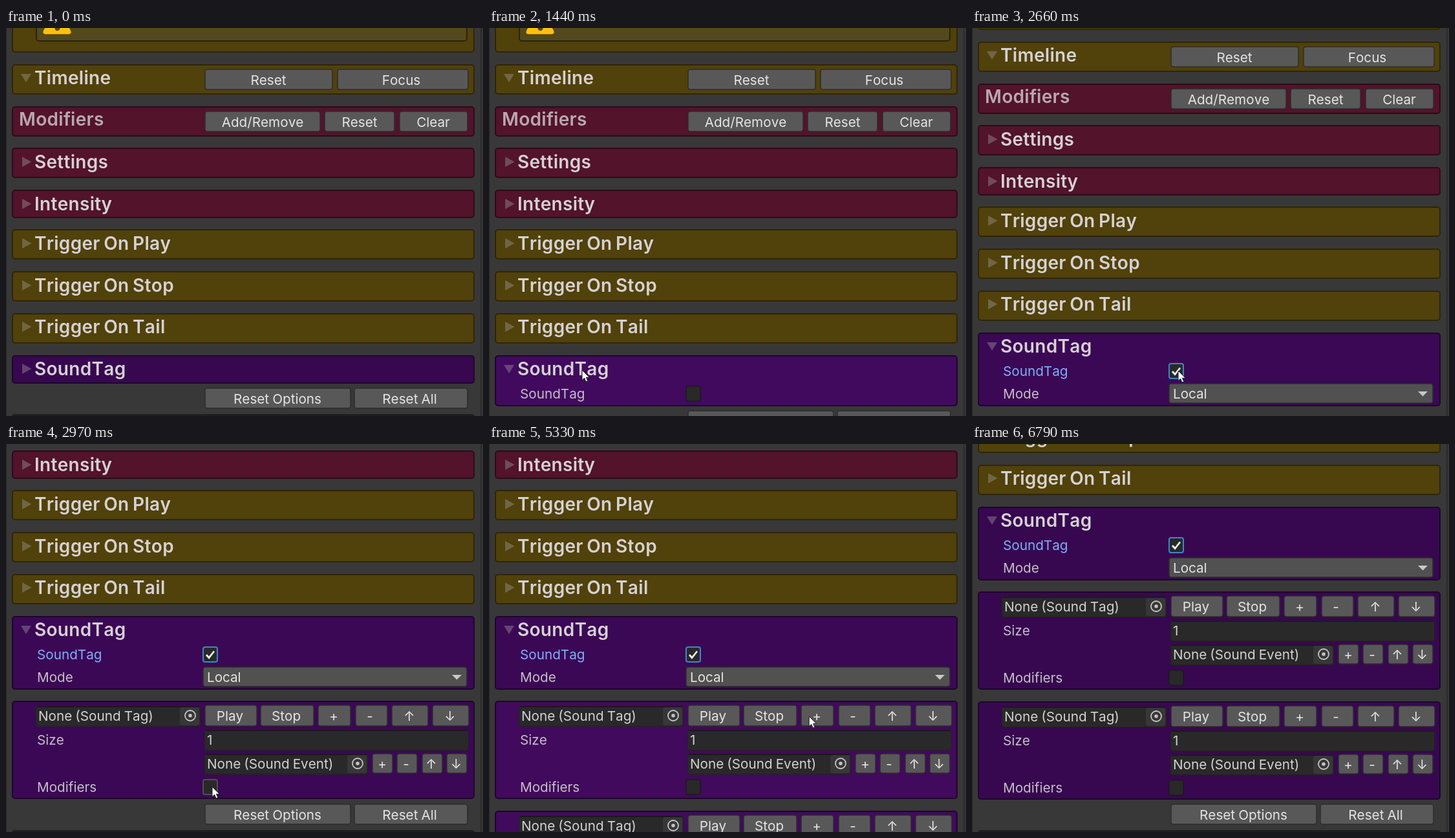
These frames come from a looping animation (738x600 px, 8000 ms). An HTML page:

```html
<!DOCTYPE html>
<html lang="en">
<head>
<meta charset="utf-8">
<title>Inspector panel</title>
<style>
html, body { margin: 0; width: 100%; height: 100%; overflow: hidden; background: #383838; }
svg { display: block; width: 738px; height: 600px; }
text {
  font: 400 20.7px Inter, sans-serif;
  font-kerning: none;
  font-optical-sizing: none;
  word-spacing: -.8px;
  fill: #c4bfc6;
  white-space: pre;
}
.head { font-size: 28px; font-weight: 600; letter-spacing: .3px; word-spacing: -1.8px; fill: #d5d2d3; }
.dim { fill: #b9a8ae; }
.btn, .pick { fill: #e4e4e4; }
.btn { text-anchor: middle; }
.val { fill: #d2d2d2; }
.on { fill: #7fb0fb; }
</style>
</head>
<body>
<svg viewBox="0 0 738 600">
  <rect width="738" height="600" fill="#383838"/>
  <g id="page"></g>
  <rect width="1" height="600" fill="#292929"/>
  <rect x="734" width="2" height="600" fill="#2a2a2a"/>
  <path id="cursor" d="M0 0V15.6L3.6 12.3L6 18L8.8 16.8L6.4 11.3H11.2Z"
    fill="#fff" stroke="#1c1c1c" stroke-width="1" stroke-linejoin="round"/>
</svg>
<script>
const LOOP = 8000;
const page = document.getElementById('page');
const cursor = document.getElementById('cursor');

const OLIVE = ['#51410a', '#2f2608'];
const WINE = ['#52132b', '#2e0a18'];

// Each phase: start, scroll, foldout open, checkbox on, tag blocks, purple tints, hover, pressed
const phases = [
  { t: 0, scroll: 0, open: 0, on: 0, tags: 0, tint: '#370850' },
  { t: 1380, scroll: 0, open: 1, on: 0, tags: 0, tint: '#3c0957' },
  { t: 1440, scroll: 0, open: 1, on: 0, tags: 0, tint: '#410a5e' },
  { t: 1810, scroll: 35, open: 1, on: 0, tags: 0, tint: '#410a5e' },
  { t: 2660, scroll: 35, open: 1, on: 1, tags: 1, tint: '#3b0855' },
  { t: 2970, scroll: 240, open: 1, on: 1, tags: 1, tint: '#3b0855', hover: 1 },
  { t: 3200, scroll: 240, open: 1, on: 1, tags: 1, tint: '#3b0855' },
  { t: 5200, scroll: 240, open: 1, on: 1, tags: 1, tint: '#3b0855', press: 1 },
  { t: 5270, scroll: 240, open: 1, on: 1, tags: 2, tint: '#3b0855', tagTint: '#410a5c' },
  { t: 6230, scroll: 409, open: 1, on: 1, tags: 2, tint: '#370850' }
];

// Pointer path: time, x, y
const moves = [
  [490, 21, 543], [850, 153, 528],
  [1110, 153, 528], [1230, 144, 529],
  [2050, 144, 529], [2260, 230, 476], [2490, 319, 530],
  [3140, 319, 530], [3740, 322, 412],
  [4050, 322, 412], [4140, 286, 420], [4290, 398, 434], [4830, 501, 422],
  [5200, 501, 422], [5990, 422, 410],
  [6050, 422, 408], [6170, 420, 400], [6230, 420, 392],
  [6600, 420, 392], [6730, 304, 500]
];
const HIDE = 6790;

const rect = (x, y, w, h, fill, stroke = 'none', sw = 1.5, r = 3.5) =>
  `<rect x="${x}" y="${y}" width="${w}" height="${h}" rx="${r}" fill="${fill}" stroke="${stroke}" stroke-width="${sw}"/>`;

const text = (x, y, s, cls = '') => `<text x="${x}" y="${y}" class="${cls}">${s}</text>`;

const panel = (top, bottom, [fill, edge]) => rect(10, top, 714, bottom - top, fill, edge, 2, 4);

// mid is the centre of the label
function button(x1, x2, y, h, label, mid, fill = '#585858') {
  return rect(x1, y, x2 - x1, h, fill, '#2c2c2c') + text(mid, y + h / 2 + 8, label, 'btn');
}

function arrow(base, open) {
  const d = open
    ? `M23 ${base - 16}H39L31 ${base - 3}Z`
    : `M25 ${base - 18}V${base - 2}L39.5 ${base - 10}Z`;
  return `<path d="${d}" fill="#9a9a9a" opacity=".42"/>`;
}

const foldout = (top, bottom, base, colors, title, open) =>
  panel(top, bottom, colors) + arrow(base, open) + text(44, base, title, 'head');

function checkbox(y, on, hover) {
  const edge = on ? '#3d86c6' : hover ? '#5c5c5c' : '#1b1b1b';
  let s = rect(305, y, 22, 23, '#292929', edge, on ? 2 : 1.5, 3);
  if (on) {
    s += `<path d="M310 ${y + 12}L314 ${y + 16.5}L322 ${y + 6.5}" fill="none" stroke="#f0f0f0" stroke-width="2.8"/>`;
  }
  return s;
}

const field = (x, y, w, h) =>
  rect(x, y, w, h, '#222222', 'none', 0) +
  rect(x + 1, y + 1, w - 2, h - 2, '#292929', 'none', 0, 3) +
  rect(x + 2, y + .5, w - 4, 1.5, '#171717', 'none', 0, 1);

function objectField(x, y, w, h, label) {
  const cx = x + w - 16, cy = y + h / 2 - 1;
  return field(x, y, w, h) +
    rect(x + w - 32, y + 2, 30, h - 4, '#373737', 'none', 0) +
    `<circle cx="${cx}" cy="${cy}" r="8" fill="none" stroke="#c4c4c4" stroke-width="1.8"/>` +
    `<circle cx="${cx}" cy="${cy}" r="2.8" fill="#c4c4c4"/>` +
    text(x + 4, cy + 8, label, 'val');
}

function tagBlock(y, p) {
  return panel(y, y + 150, purple(p.tagTint || p.tint)) +
    objectField(46, y + 7, 255, 32, 'None (Sound Tag)') +
    button(308, 388, y + 6, 32, 'Play', 346.5) +
    button(394, 476, y + 6, 32, 'Stop', 433.5) +
    button(483, 533, y + 6, 32, '+', 507, p.press ? '#46607c' : '#585858') +
    button(541, 590, y + 6, 32, '-', 563) +
    button(597, 653, y + 6, 32, '↑', 624) +
    button(660, 716, y + 6, 32, '↓', 687) +
    text(48, y + 67, 'Size') +
    field(307, y + 44, 409, 32) + text(311, y + 67, '1', 'val') +
    objectField(307, y + 81, 253, 32, 'None (Sound Event)') +
    button(567, 598, y + 81, 30, '+', 582) +
    button(605, 636, y + 81, 30, '-', 619) +
    button(644, 675, y + 81, 30, '↑', 658) +
    button(682, 713, y + 81, 30, '↓', 696.5) +
    text(48, y + 140, 'Modifiers') +
    checkbox(y + 121, false, p.hover);
}

const purple = tint => [tint, '#1e052c'];

function warningBox() {
  return panel(-60, 37, OLIVE) +
    rect(47, -40, 666, 60, '#54491d', '#2a240d', 2, 4) +
    '<path d="M79 -32L99 3Q102 9 97 9H61Q56 9 59 3Z" fill="#ffc10d" stroke="#ffc10d" stroke-width="1"/>' +
    '<circle cx="79.5" cy="0" r="4.2" fill="#54491d"/>';
}

function soundTag(p) {
  const bottom = p.on ? 619 : p.open ? 584 : 549;
  let s = foldout(507, bottom, 537, purple(p.tint), 'SoundTag', p.open);
  if (p.open) s += text(48, 573, 'SoundTag', p.on ? 'on' : '') + checkbox(554, p.on);
  if (p.on) {
    s += text(48, 608, 'Mode') +
      rect(305, 585, 408, 30, '#515151', '#2c2c2c') +
      text(311, 607.5, 'Local', 'pick') +
      '<path d="M690 597H705L697.5 604.5Z" fill="#c8c8c8"/>';
  }
  for (let i = 0; i < p.tags; i++) s += tagBlock(638 + i * 170, p);
  return s;
}

function draw(p) {
  const end = p.tags ? 669 + p.tags * 169 : p.open ? 633 : 598;
  page.setAttribute('transform', `translate(0 ${-p.scroll})`);
  page.innerHTML = warningBox() +
    foldout(57, 102, 87, OLIVE, 'Timeline', true) +
    button(308, 505, 64, 31, 'Reset', 406) +
    button(513, 715, 64, 31, 'Focus', 611.5) +
    panel(122, 167, WINE) + text(20, 151, 'Modifiers', 'head dim') +
    button(308, 486, 129, 31, 'Add/Remove', 397) +
    button(493, 601, 129, 31, 'Reset', 547) +
    button(609, 714, 129, 31, 'Clear', 661) +
    foldout(186, 231, 217, WINE, 'Settings') +
    foldout(251, 293, 282, WINE, 'Intensity') +
    foldout(312, 357, 343, OLIVE, 'Trigger On Play') +
    foldout(377, 422, 408, OLIVE, 'Trigger On Stop') +
    foldout(442, 487, 472, OLIVE, 'Trigger On Tail') +
    soundTag(p) +
    button(308, 533, end - 41, 31, 'Reset Options', 420) +
    button(539, 714, end - 41, 31, 'Reset All', 624.5) +
    rect(9, end - 1, 716, 20, '#1f1f1f', 'none', 0, 4);
}

function pointer(t) {
  let i = 0;
  while (i < moves.length - 1 && moves[i + 1][0] <= t) i++;
  const a = moves[i], b = moves[i + 1] || a;
  const k = b === a ? 0 : (t - a[0]) / (b[0] - a[0]);
  const e = k * k * (3 - 2 * k);
  return [a[1] + (b[1] - a[1]) * e, a[2] + (b[2] - a[2]) * e];
}

let current = null;
function render(t) {
  const p = phases.filter(q => q.t <= t).pop();
  if (p !== current) draw(current = p);
  const shown = t >= moves[0][0] && t < HIDE;
  cursor.setAttribute('visibility', shown ? 'visible' : 'hidden');
  if (shown) cursor.setAttribute('transform', `translate(${pointer(t)})`);
}

const start = performance.now();
function tick() {
  render((performance.now() - start) % LOOP);
  requestAnimationFrame(tick);
}
render(0);
requestAnimationFrame(tick);
</script>
</body>
</html>
```
